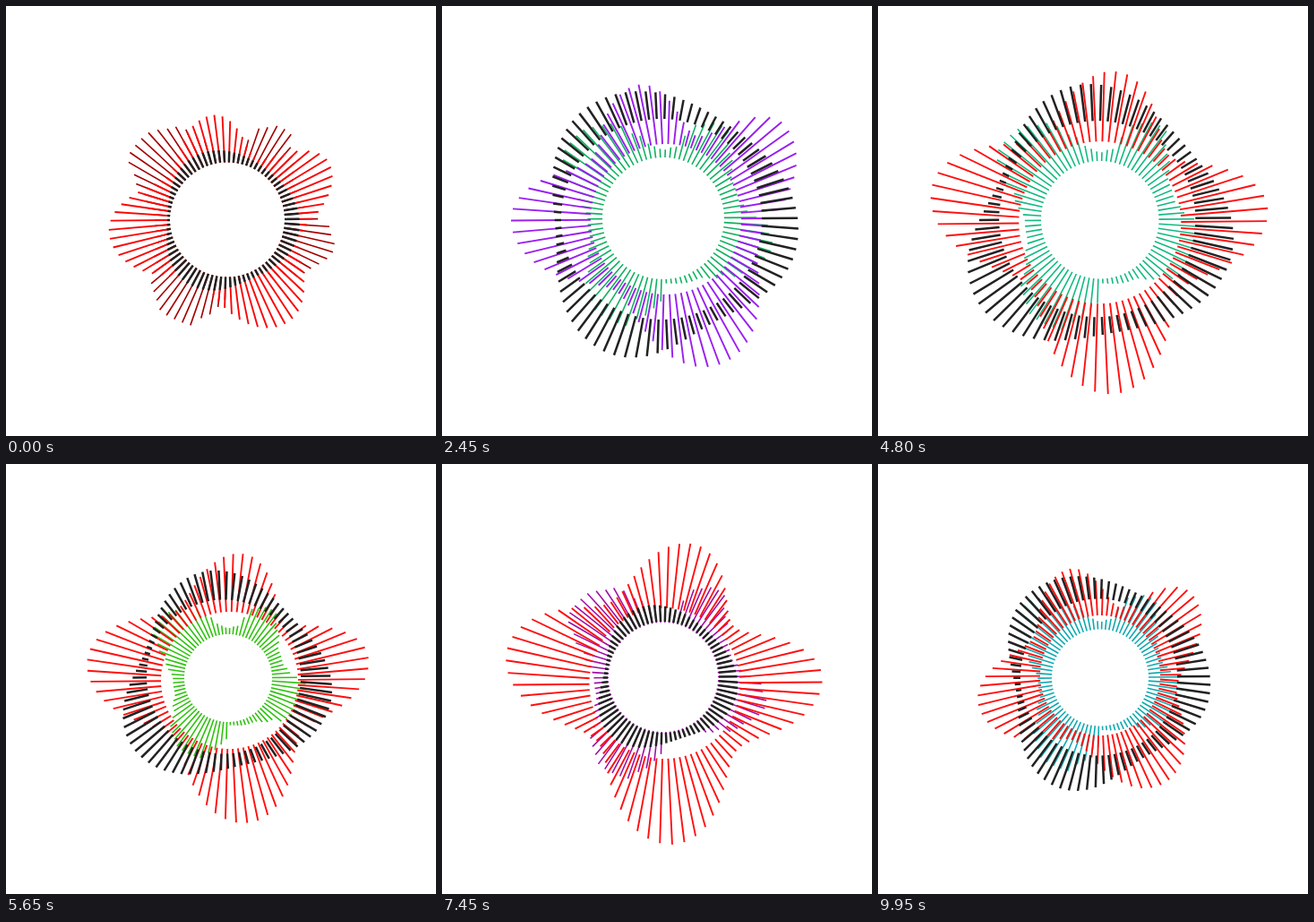
Recreate the animation shown at these times as an HTML page with a canvas. Size 480 by 480 pixels, loop 10 s.

```html
<!DOCTYPE html>
<html lang="en">
<head>
<meta charset="utf-8">
<title>Radial bars</title>
<style>
  html, body { margin: 0; width: 100%; height: 100%; overflow: hidden; background: #fff; }
  canvas { display: block; width: 480px; height: 480px; }
</style>
</head>
<body>
<canvas id="stage" width="480" height="480"></canvas>
<script>
const ctx = document.getElementById('stage').getContext('2d');
const LOOP = 10000, BARS = 82, START = 87.3, STEP = 360 / BARS;
const times = [0, 1050, 2450, 3950, 5650, 7450, 9950];

// Poses: x, y, radius, bar length, then hue, saturation, lightness
const inner = [
  [247, 238.5, 64, 68, 0, 100, 32],
  [243, 251, 71, 75, 177, 88, 53],
  [247, 237, 68, 66, 150, 84, 38],
  [247.5, 238.5, 49.5, 57, 210, 80, 39],
  [248, 239, 49, 51, 109, 85, 41],
  [247, 238, 61, 66, 297, 82, 36],
  [248, 238.5, 54, 63, 183, 83, 38]
];
const middle = [
  [247, 238.5, 64, 69, 360, 95, 50],
  [245, 244, 81, 104, 244, 83, 38],
  [250, 238, 84, 89, 275, 87, 53],
  [246, 242, 59, 68, 360, 100, 53],
  [249.5, 241.5, 76.5, 84, 360, 100, 53],
  [248.5, 245, 84, 96, 360, 100, 53],
  [248, 236, 67, 73, 360, 100, 53]
];
const outer = [
  [247, 238.5, 64, 20],
  [244, 236, 86, 45],
  [245, 238, 112, 49],
  [246.5, 238, 78, 37],
  [243, 237.5, 86, 43],
  [247, 238, 62, 26],
  [246.5, 238, 87.5, 44]
];

// Lobe directions in degrees, going counterclockwise
const middleLobes = [
  [60, -30, -98, -187], [74, -27, -105, -187], [69, -38, -102, -180],
  [88, 0, -83, -165], [82, -10, -84, -171], [87, -2, -78, -168], [59, -42, -107, -194]
];
const outerLobes = [
  [10, -115, -240], [40, -85, -187], [12, -122, -248],
  [20, -95, -215], [15, -100, -220], [15, -110, -230], [10, -130, -250]
];

const innerShape = [
  [90, .07], [60, .15], [45, .35], [36, .6], [15, .88], [5, .75], [-5, .4],
  [-15, .28], [-28, .3], [-45, .55], [-55, .83], [-62, .8], [-70, .65],
  [-80, .2], [-90, .13], [-98, .2], [-110, .5], [-118, .8], [-135, 1],
  [-147, 1], [-155, .75], [-165, .45], [-180, .25], [-195, .25], [-210, .42],
  [-224, .75], [-235, .92], [-250, .9], [-257, .7], [-264, .5], [-270, .35]
];

const mix = (a, b, u) => a + (b - a) * u;
const blend = (poses, i, u) => poses[i].map((v, k) => mix(v, poses[Math.min(i + 1, poses.length - 1)][k], u));
const ease = u => (1 - Math.cos(Math.PI * u)) / 2;

function sample(points, angle) {
  for (let k = 1; k < points.length; k++) {
    const [a, va] = points[k - 1], [b, vb] = points[k];
    if (angle <= a && angle >= b) return mix(va, vb, ease((a - angle) / (a - b)));
  }
  return 0;
}

// Alternating peaks and valleys, repeated on both sides of the circle
function lobeShape(lobes, peaks, valleys) {
  const n = lobes.length, points = [];
  for (let turn = 360; turn >= -360; turn -= 360) {
    lobes.forEach((a, k) => {
      const next = k + 1 < n ? lobes[k + 1] : lobes[0] - 360;
      points.push([a + turn, peaks[k]], [(a + next) / 2 + turn, valleys[k]]);
    });
  }
  return points;
}

function drawRing([x, y, r, len], shape, scale, color, width) {
  ctx.strokeStyle = color;
  ctx.lineWidth = width;
  ctx.beginPath();
  for (let i = 0; i < BARS; i++) {
    const deg = START - i * STEP, a = deg * Math.PI / 180;
    const c = Math.cos(a), s = Math.sin(a);
    const from = r * scale, to = from + len * scale * sample(shape, deg);
    ctx.moveTo(x + c * from, y + s * from);
    ctx.lineTo(x + c * to, y + s * to);
  }
  ctx.stroke();
}

const hsl = p => `hsl(${p[4]}, ${p[5]}%, ${p[6]}%)`;

function draw(t) {
  let i = times.length - 1;
  while (times[i] > t) i--;
  const span = (times[i + 1] || LOOP) - times[i];
  const u = i < times.length - 1 ? (t - times[i]) / span : 0;
  const a = blend(inner, i, u), b = blend(middle, i, u), c = blend(outer, i, u);

  // Beats swell all rings until the longest bars reach a common radius
  const beat = Math.sin(Math.PI * Math.round(span / 500) * u) ** 2;
  const scale = mix(1, Math.max(1, 192 / (b[2] + b[3])), beat);

  ctx.fillStyle = '#fff';
  ctx.fillRect(0, 0, 480, 480);
  drawRing(a, innerShape, scale, hsl(a), 1.6);
  drawRing(b, lobeShape(blend(middleLobes, i, u), [1, .96, .78, 1], [.27, .17, .26, .16]), scale, hsl(b), 1.9);
  drawRing(c, lobeShape(blend(outerLobes, i, u), [.86, .78, 1], [.35, .14, .35]), scale, '#222', 2.5);
}

function tick() {
  draw(performance.now() % LOOP);
  requestAnimationFrame(tick);
}
tick();
</script>
</body>
</html>
```
